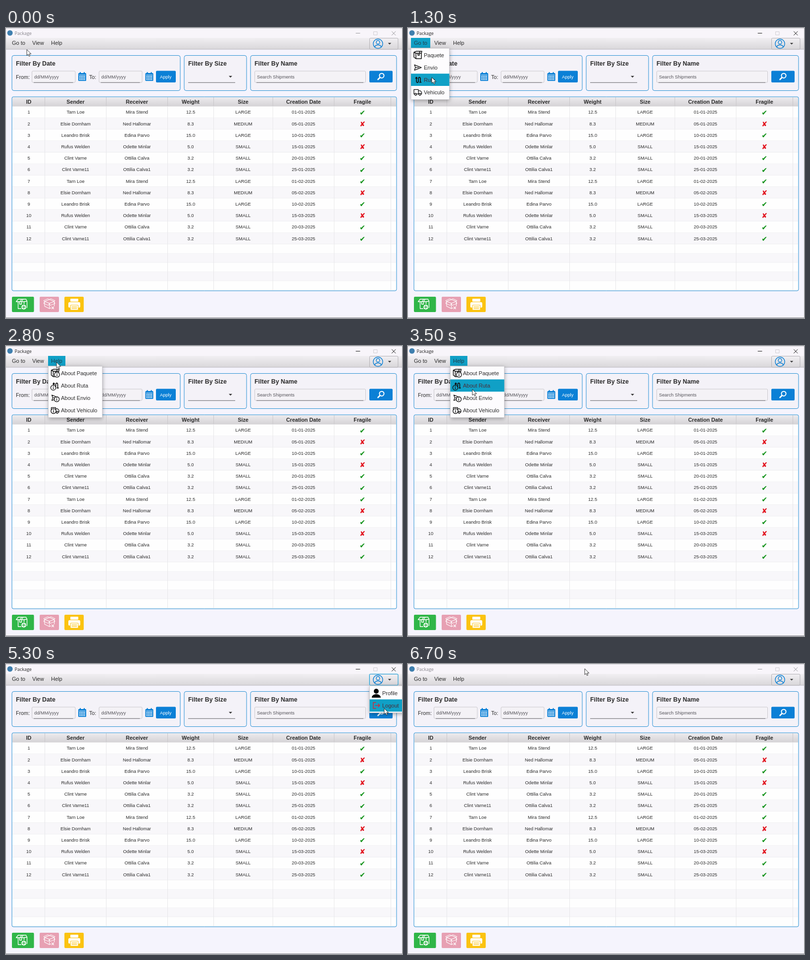
Recreate the animation shown at these times as an HTML page with a canvas. Size 800 by 586 pixels, loop 6800 ms.

```html
<!DOCTYPE html>
<html lang="en">
<head>
<meta charset="utf-8">
<title>Package</title>
<style>
html, body { margin: 0; width: 100%; height: 100%; overflow: hidden; background: #f5f4fd; }
canvas { display: block; width: 800px; height: 586px; }
</style>
</head>
<body>
<canvas id="stage"></canvas>
<script>
const W = 800, H = 586, LOOP = 6800, STEP = 100;
const canvas = document.getElementById('stage');
const dpr = window.devicePixelRatio || 1;
canvas.width = W * dpr;
canvas.height = H * dpr;
const ctx = canvas.getContext('2d');

const SANS = '"Liberation Sans", Arial, sans-serif';
const BLUE = '#0b80d6', TEAL = '#10a0c6', INK = '#2b2b2b', EDGE = '#2b92d4';

// ---------- helpers ----------
function box(x, y, w, h, fill, stroke, r = 0) {
  ctx.beginPath();
  ctx.roundRect(x, y, w, h, r);
  if (fill) { ctx.fillStyle = fill; ctx.fill(); }
  if (stroke) { ctx.strokeStyle = stroke; ctx.lineWidth = 1; ctx.stroke(); }
}

function text(s, x, y, size, color = INK, align = 'left', weight = '', family = SANS) {
  ctx.font = `${weight} ${size}px ${family}`;
  ctx.textAlign = align;
  ctx.fillStyle = color;
  ctx.fillText(s, x, y + size * 0.358);
}

function icon(d, x, y, stroke, width = 1.2, fill, scale = 1) {
  ctx.save();
  ctx.translate(x, y);
  ctx.scale(scale, scale);
  const p = new Path2D(d);
  if (fill) { ctx.fillStyle = fill; ctx.fill(p); }
  if (stroke) {
    ctx.strokeStyle = stroke;
    ctx.lineWidth = width;
    ctx.lineJoin = ctx.lineCap = 'round';
    ctx.stroke(p);
  }
  ctx.restore();
}

function disc(x, y, r, fill, stroke, width = 1) {
  ctx.beginPath();
  ctx.arc(x, y, r, 0, Math.PI * 2);
  if (fill) { ctx.fillStyle = fill; ctx.fill(); }
  if (stroke) { ctx.strokeStyle = stroke; ctx.lineWidth = width; ctx.stroke(); }
}

function shade(y0, y1, a, b) {
  const g = ctx.createLinearGradient(0, y0, 0, y1);
  g.addColorStop(0, a);
  g.addColorStop(1, b);
  return g;
}

// ---------- table data ----------
const cols = [
  ['ID', 46], ['Sender', 140.5], ['Receiver', 264.5], ['Weight', 373],
  ['Size', 479], ['Creation Date', 601], ['Fragile', 720]
];
const parcels = [
  ['Tarn Loe', 'Mira Stend', '12.5', 'LARGE', 1],
  ['Elsie Dornham', 'Ned Hallomar', '8.3', 'MEDIUM', 0],
  ['Leandro Brisk', 'Edina Parvo', '15.0', 'LARGE', 1],
  ['Rufus Welden', 'Odette Minlar', '5.0', 'SMALL', 0],
  ['Clint Varne', 'Ottilia Calva', '3.2', 'SMALL', 1],
  ['Clint Varne11', 'Ottilia Calva1', '3.2', 'SMALL', 1]
];
const days = ['01', '05', '10', '15', '20', '25'];
const two = n => String(n).padStart(2, '0');

function drawTable() {
  box(12, 139, 777, 392, '#fefefe', null, 3);
  box(13, 140, 775, 18.5, shade(139, 158, '#eeecef', '#d5d3d6'));
  for (let i = 0; i < 12; i++) {
    if (i % 2) box(13, 158.5 + i * 23.2, 775, 23.2, '#f8f7fa');
    box(13, 181 + i * 23.2, 775, 0.8, '#ececef');
  }
  for (let i = 0; i < 5; i++) {
    const y = 436.9 + i * 18.5;
    if (i % 2) box(13, y, 775, 18.5, '#f8f7fa');
    box(13, y + 18, 775, 0.8, '#ececef');
  }
  for (const x of [78, 202, 326, 419, 538.5, 662.5, 777]) {
    box(x, 158, 1, 372, '#e7e7ea');
    box(x, 140, 1, 18, '#c9c7ca');
  }
  for (const [name, x] of cols) text(name, x, 149.5, 10.8, INK, 'center', 'bold');
  for (let i = 0; i < 12; i++) {
    const [from, to, weight, size, fragile] = parcels[i % 6];
    const month = i < 6 ? 1 : i < 9 ? 2 : 3;
    const cells = [i + 1, from, to, weight, size, `${days[i % 6]}-${two(month)}-2025`];
    const y = 170 + i * 23.2;
    cells.forEach((c, k) => text(String(c), cols[k][1], y, 9.3, INK, 'center'));
    text(fragile ? '✔' : '✘', 720, y + 0.5, 14, fragile ? '#078f10' : '#e10a17',
      'center', '', '"DejaVu Sans", sans-serif');
  }
  box(12, 139, 777, 392, null, EDGE, 3);
}

// ---------- window chrome ----------
function drawFrame(active) {
  const c = active ? '#1a1a1a' : '#9a9a9e';
  box(0, 0, W, H, '#f5f4fd');
  box(0, 0, W, 20, '#f8f5fa');
  box(0, 0, W, 1, '#d2d0d5');
  disc(8, 10, 5.5, '#3f7fae');
  text('Package', 17.5, 11, 9, active ? '#222' : '#85838a', 'left', '', '"Open Sans", "Noto Sans", sans-serif');
  icon('M707 10.5H715', 0, 0, c, 1);
  icon('M743 7.5H750V14H743Z', 0, 0, '#cfcdd2', 1);
  icon('M779.5 7L787 14.5M787 7L779.5 14.5', 0, 0, c, 1);
  box(0, 20, W, 23, shade(20, 43, '#f1eff2', '#d9d7da'));
  box(0, 42.5, W, 1, '#bbb9bd');
  box(0, 585, W, 1, '#8d8c92');
}

const heads = { go: ['Go to', 6, 39, 12], view: ['View', 46, 39, 53], help: ['Help', 85, 35, 91] };

function drawMenuBar(open) {
  for (const key in heads) {
    const [label, x, w, tx] = heads[key];
    if (open === key) box(x, 20, w, 20, TEAL);
    text(label, tx, 30.5, 11, open === key ? '#243d4a' : INK);
  }
  const on = open === 'user';
  if (on) box(733, 19.5, 60, 24.5, '#a9d9ef', null, 3);
  box(734.5, 20.5, 57.5, 22.5, shade(20, 43, '#f2f0f3', '#d8d6d9'), on ? '#1d9ad2' : '#b4b2b6', 2);
  disc(751.5, 31.8, 9.6, null, BLUE, 1.4);
  disc(751.5, 28.8, 3.6, null, BLUE, 1.4);
  icon('M745 38.5C746 32.8 757 32.8 758 38.5', 0, 0, BLUE, 1.4);
  icon('M771.7 30H778.3L775 33.6Z', 0, 0, null, 0, '#444');
}

// ---------- filters ----------
function calendar(x) {
  box(x, 91, 16, 16, BLUE, null, 1.5);
  box(x + 3, 89, 2, 4, BLUE);
  box(x + 11, 89, 2, 4, BLUE);
  box(x + 1.5, 94.5, 13, 1, '#fff');
  for (let r = 0; r < 3; r++)
    for (let k = 0; k < 4; k++) box(x + 2 + k * 3.2, 97 + r * 3.1, 2.2, 2, '#eef6fd');
}

function field(x, w, hint) {
  box(x + 0.5, 87, w, 23, '#f4f2f6', '#cbc9ce', 2);
  box(x + 4, 109.8, w - 8, 1, '#706f74');
  text(hint, x + 5, 99, 9.3, '#55545a');
}

function drawFilters() {
  const panels = [['Filter By Date', 12, 340], ['Filter By Size', 360, 126], ['Filter By Name', 494, 295]];
  for (const [title, x, w] of panels) {
    box(x, 55.5, w, 71, '#f4f2f8', EDGE, 4);
    text(title, x + 8, 72, 12.4, INK, 'left', 'bold');
  }
  text('From:', 20, 99, 10.7);
  field(52, 87.5, 'dd/MM/yyyy');
  calendar(146);
  text('To:', 168, 99, 10.7);
  field(187.5, 87, 'dd/MM/yyyy');
  calendar(281.5);
  box(303, 86.5, 40, 23.5, BLUE, null, 2);
  text('Apply', 322.7, 99, 9.3, '#fff', 'center');
  box(368, 109.8, 95, 1, '#626166');
  icon('M450 96.7H457L453.5 100.3Z', 0, 0, null, 0, '#333');
  field(502, 224, 'Search Shipments');
  box(734, 86.5, 47, 23.5, BLUE, null, 2);
  disc(759, 96.3, 4.6, null, '#fff', 2);
  icon('M755.5 100L751.5 104', 0, 0, '#fff', 2.6);
}

// ---------- bottom buttons ----------
const CUBE = 'M12 2L22 6V16L12 21L2 16V6ZM2 6L12 10L22 6M12 10V21';

function drawButtons() {
  box(12, 543, 44.5, 31, '#30b648', null, 2);
  icon('M1 6L5 1H21L23 5V18L19 20H5V7M1 6H17L23 5M17 6V20M9 6L12 1M8 6V11H12V6L15 1', 19.5, 547, '#fff', 1.3);
  disc(36, 564, 5.4, '#fff', '#30b648', 1.2);
  icon('M33 564H39M36 561V567', 0, 0, '#30b648', 1.4);

  box(68, 543, 39, 31, '#e7a0b3', null, 2);
  icon(CUBE, 76, 546.5, '#fff', 1.1, null, 0.98);
  icon('M2 6L0 10L10 14L12 10L14 14L24 10L22 6M12 2L9 0L0 4L2 6M12 2L15 0L24 4L22 6', 76, 547, '#fff', 1, null, 0.96);
  box(91, 562, 7, 7, '#e7a0b3');
  icon('M92.5 563.5L96.5 567.5M96.5 563.5L92.5 567.5', 0, 0, '#fff', 1.2);

  box(118, 543, 39, 31, '#fbc311', null, 2);
  box(130, 547, 16, 6, '#fff', null, 1);
  box(126, 554, 24, 11, '#fff', null, 2.5);
  box(130, 560, 16, 10, '#fff', '#fbc311', 1);
  box(132.5, 563, 11, 1.2, '#fbc311');
  box(132.5, 566, 11, 1.2, '#fbc311');
}

// ---------- popups ----------
const PARCEL = 'M5 5H16V16H5ZM5 5L1 3V13L5 16M1 3L6 1H17L16 5M9 5V9H12V5L13 1';
const SEND = 'M1 1L15 6.5L1 12L3 6.5ZM3 6.5H10';
const ROUTE = 'M2 2V8C2 13 6 13 6 8V4C6 0 10 0 10 4V11M0.5 3L2 0.8L3.5 3M8.5 11H11.5';
const TRUCK = 'M2.5 10H1V1H10V10H6.5M10 3.5H14L16.5 6.5V10H15M11 10H10';

const glyphs = {
  Paquete: (x, y) => icon(PARCEL, x, y - 9, '#111', 1.5),
  Envio: (x, y) => icon(SEND, x + 1, y - 6.5, '#111', 1.3),
  Ruta: (x, y) => icon(ROUTE, x + 4, y - 6, '#111', 1.7),
  Vehiculo: (x, y) => {
    icon(TRUCK, x, y - 6, '#111', 1.3);
    disc(x + 4.5, y + 4.5, 1.9, null, '#111', 1.3);
    disc(x + 13, y + 4.5, 1.9, null, '#111', 1.3);
  },
  Profile: (x, y) => {
    disc(x + 9, y - 4, 4.9, '#000');
    icon('M0 9C0 -0.5 18 -0.5 18 9Z', x, y, null, 0, '#000');
  },
  Logout: (x, y) => icon('M6 1H1V13H6M5 7H14M11 4L14 7L11 10', x + 2, y - 7, '#d2283a', 1.4)
};
const badges = { Paquete: [12.5, 3], Ruta: [5, 4.5], Envio: [12, 3], Vehiculo: [5.5, 2] };

function infoBadge(x, y, bg) {
  disc(x, y, 5.1, bg, '#111', 1.3);
  box(x - 0.7, y - 0.8, 1.4, 3.8, '#111');
  disc(x, y - 2.6, 0.9, '#111');
}

const popups = {
  go: { x: 6, y: 41, w: 77.5, h: 103.5, top: 55, items: ['Paquete', 'Envio', 'Ruta', 'Vehiculo'] },
  help: { x: 85.5, y: 41, w: 109, h: 103.5, top: 55, about: true, items: ['Paquete', 'Ruta', 'Envio', 'Vehiculo'] },
  user: { x: 734.5, y: 44, w: 70, h: 54.5, top: 59, items: ['Profile', 'Logout'] }
};

function drawPopup(open, hover) {
  const p = popups[open];
  if (!p) return;
  ctx.save();
  ctx.shadowColor = 'rgba(0,0,0,.35)';
  ctx.shadowBlur = 8 * dpr;
  ctx.shadowOffsetY = 2 * dpr;
  box(p.x, p.y, p.w, p.h, '#fdfcfe');
  ctx.restore();
  box(p.x, p.y, p.w, p.h, null, '#cfcdd2');
  p.items.forEach((name, i) => {
    const y = p.top + i * 24.8, on = i === hover;
    if (on) box(p.x, y - 12.4, p.w, 24.8, TEAL);
    const ix = p.x + (open === 'user' ? 4.5 : 5);
    glyphs[name](ix, y);
    if (p.about) infoBadge(ix + badges[name][0], y + badges[name][1], on ? TEAL : '#fdfcfe');
    const label = p.about ? 'About ' + name : name;
    // narrow icons pull their label left
    const tx = p.about ? 111 : open === 'user' ? 760 : 32;
    text(label, tx, y + 0.3, 11, on ? '#4b2f3a' : INK);
  });
}

// ---------- motion ----------
const path = [
  [0, 42, 44], [400, 38, 30], [700, 38, 30], [900, 42, 52], [1100, 46, 76], [1300, 48, 100],
  [1500, 50, 126], [1600, 50, 126], [1900, 46, 52], [2000, 47, 21], [2200, 62, 30], [2400, 68, 32],
  [2600, 100, 31], [2800, 102, 33], [3000, 115, 56], [3500, 130, 88], [3800, 136, 108],
  [4100, 146, 130], [4200, 190, 125], [4400, 719, 37], [4600, 752, 33], [4900, 756, 34],
  [5100, 762, 58], [5300, 764, 90], [5700, 766, 84], [5900, 750, 72], [6400, 420, 20], [6700, 357, 10]
];
// start time, open menu, hovered item
const states = [
  [0, '', -1], [400, 'go', -1], [900, 'go', 0], [1100, 'go', 1], [1300, 'go', 2], [1500, 'go', 3],
  [1700, 'go', 2], [1800, 'go', 1], [1900, 'go', 0], [2100, 'view', -1], [2500, 'help', -1],
  [2900, 'help', 0], [3200, 'help', 1], [3600, 'help', 2], [4000, 'help', 3], [4700, 'user', -1],
  [5000, 'user', 0], [5200, 'user', 1], [5700, '', -1]
];

function cursorAt(t) {
  const i = path.findIndex(k => k[0] >= t);
  if (i <= 0) return i ? path[path.length - 1].slice(1) : path[0].slice(1);
  const [t0, x0, y0] = path[i - 1], [t1, x1, y1] = path[i];
  const k = (t - t0) / (t1 - t0);
  return [x0 + (x1 - x0) * k, y0 + (y1 - y0) * k];
}

function draw(t) {
  const [, open, hover] = states.filter(s => s[0] <= t).pop();
  ctx.setTransform(dpr, 0, 0, dpr, 0, 0);
  drawFrame(t >= 400 && t < 6500);
  drawMenuBar(open);
  drawFilters();
  drawTable();
  drawButtons();
  drawPopup(open, hover);
  const [x, y] = cursorAt(t);
  icon('M0 0V11.5L2.7 9L4.6 13.2L6.6 12.3L4.8 8.3H8.4Z', x, y, '#222', 0.9, '#fff');
}

const start = performance.now();
function tick() {
  const t = (performance.now() - start) % LOOP;
  draw(Math.floor(t / STEP) * STEP);
  requestAnimationFrame(tick);
}
tick();
</script>
</body>
</html>
```
